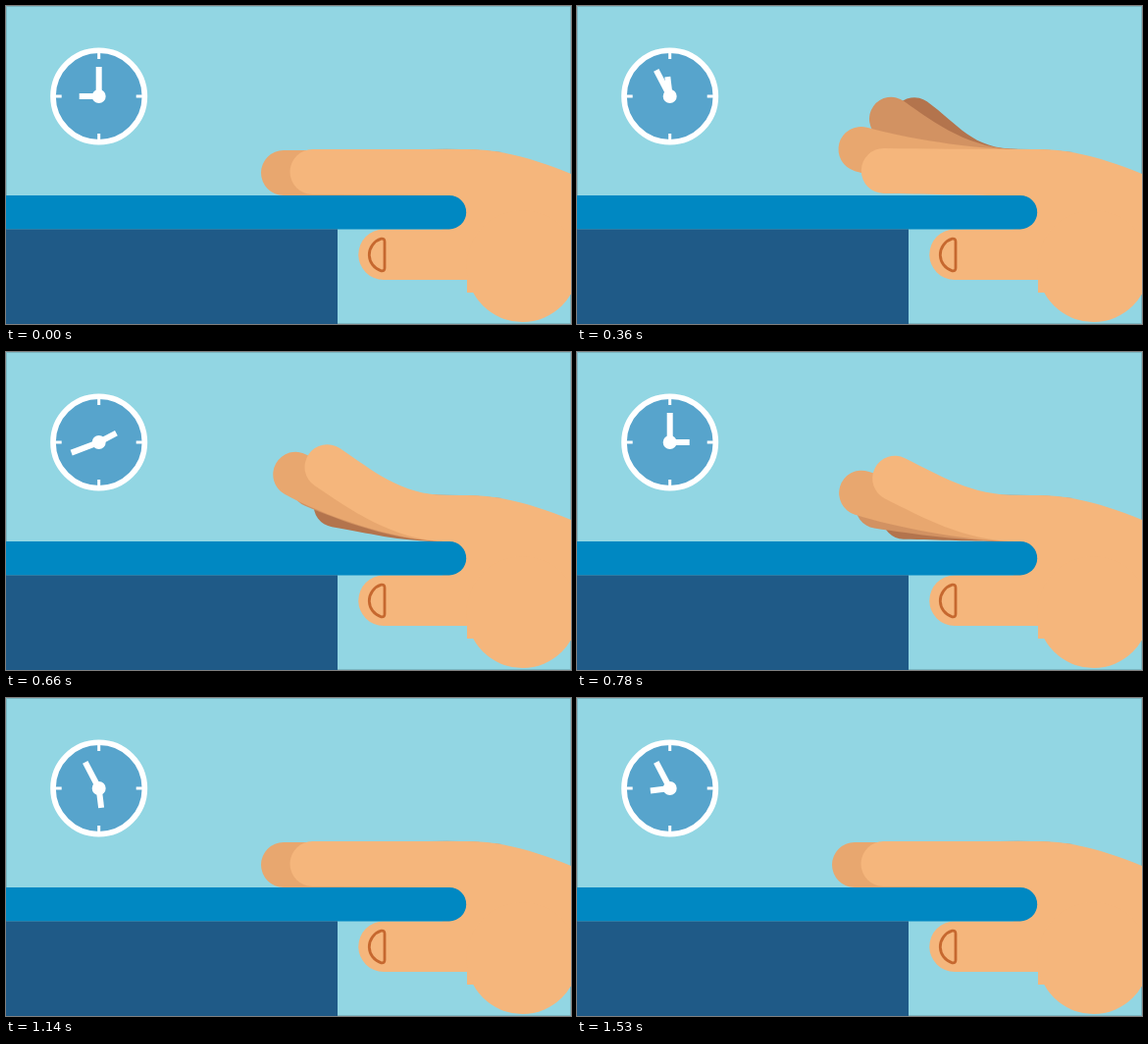
Write an HTML page that moves like this. It is 576 px wide and 324 px high and loops after 1.56 s.

```html
<!DOCTYPE html>
<html lang="en">
<head>
<meta charset="utf-8">
<title>Drumming fingers</title>
<style>
  html, body { margin: 0; width: 100%; height: 100%; overflow: hidden; }
  svg { display: block; width: 576px; height: 324px; background: #92d6e3; }
</style>
</head>
<body>
<svg viewBox="0 0 576 324">
  <rect x=".5" y=".5" width="575" height="323" fill="none" stroke="#000" stroke-opacity=".15"/>

  <g transform="translate(94.7 92)" fill="#fff">
    <circle r="46.7" fill="#57a4cc" stroke="#fff" stroke-width="5.6"/>
    <path d="M0-46V-38M0 46V38M-46 0H-38M46 0H38" stroke="#fff" stroke-width="3"/>
    <rect id="hour" x="-3" y="-20" width="6" height="20"/>
    <rect id="minute" x="-3" y="-30" width="6" height="30"/>
    <circle r="7"/>
  </g>

  <path d="M430 146Q470 144.6 506 149L470 152Z" fill="#d29262"/>
  <g id="fingers"></g>

  <g fill="#f5b67c">
    <path d="M445 146H470C505 146 540 156 576 171V292H470V279H385A25.7 25.7 0 0 1 385 227.5H445Z"/>
    <circle cx="526.5" cy="265" r="57"/>
    <path d="M386 240Q386 236.500 382.500 237.200A17 17 0 0 0 382.500 269.800Q386 270.500 386 267Z" stroke="#c6682f" stroke-width="2.800"/>
  </g>

  <path d="M0 193H452A17.200 17.200 0 0 1 452 227.400H0Z" fill="#0088c2"/>
  <rect y="227.400" width="338" height="97" fill="#1f5a87"/>
</svg>
<script>
const LOOP = 1560, STEP = 30;
const $ = id => document.getElementById(id);

// Back to front: resting tip, radius, lift height, sideways drift, start delay
const fingers = [
  { color: '#b3744d', x: 333, y: 170, r: 22, height: 56, drift: .2, delay: 0 },
  { color: '#d29262', x: 302, y: 170.5, r: 22.3, height: 62, drift: .33, delay: 108 },
  { color: '#e8a76f', x: 283, y: 170, r: 23, height: 56, drift: .27, delay: 200 },
  { color: '#f5b67c', x: 312.5, y: 169, r: 23, height: 53, drift: .29, delay: 300 },
];

for (const f of fingers) {
  f.path = document.createElementNS('http://www.w3.org/2000/svg', 'path');
  f.path.setAttribute('fill', f.color);
  $('fingers').append(f.path);
}

function ease(u) {
  return Math.sin(Math.PI / 2 * Math.min(1, Math.max(0, u))) ** 2;
}

// Quick rise, slower fall
function lift(t) {
  return t < 310 ? ease((t - 35) / 275) : ease((830 - t) / 520);
}

function fingerPath(f, t) {
  const h = f.height * lift(t - f.delay);
  const angle = h * .65 * Math.PI / 180;
  const cos = Math.cos(angle), sin = Math.sin(angle);
  const x = f.x + f.drift * h, y = f.y - h;
  const topX = x + f.r * sin, topY = y - f.r * cos;
  const lowX = x - f.r * sin, lowY = y + f.r * cos;
  const dx = 40 * cos, dy = 40 * sin;
  return `M${topX} ${topY}C${topX + dx} ${topY + dy} 402 146 450 146` +
    `V193C395 193 ${lowX + dx} ${lowY + dy} ${lowX} ${lowY}` +
    `A${f.r} ${f.r} 0 0 1 ${topX} ${topY}Z`;
}

function draw(now) {
  const t = Math.floor(now % LOOP / STEP) * STEP;
  $('hour').setAttribute('transform', `rotate(${270 + 360 * t / LOOP})`);
  $('minute').setAttribute('transform', `rotate(${360 * 4 * t / LOOP})`);
  for (const f of fingers) f.path.setAttribute('d', fingerPath(f, t));
}

const start = performance.now();
function tick() {
  draw(performance.now() - start);
  requestAnimationFrame(tick);
}
tick();
</script>
</body>
</html>
```
